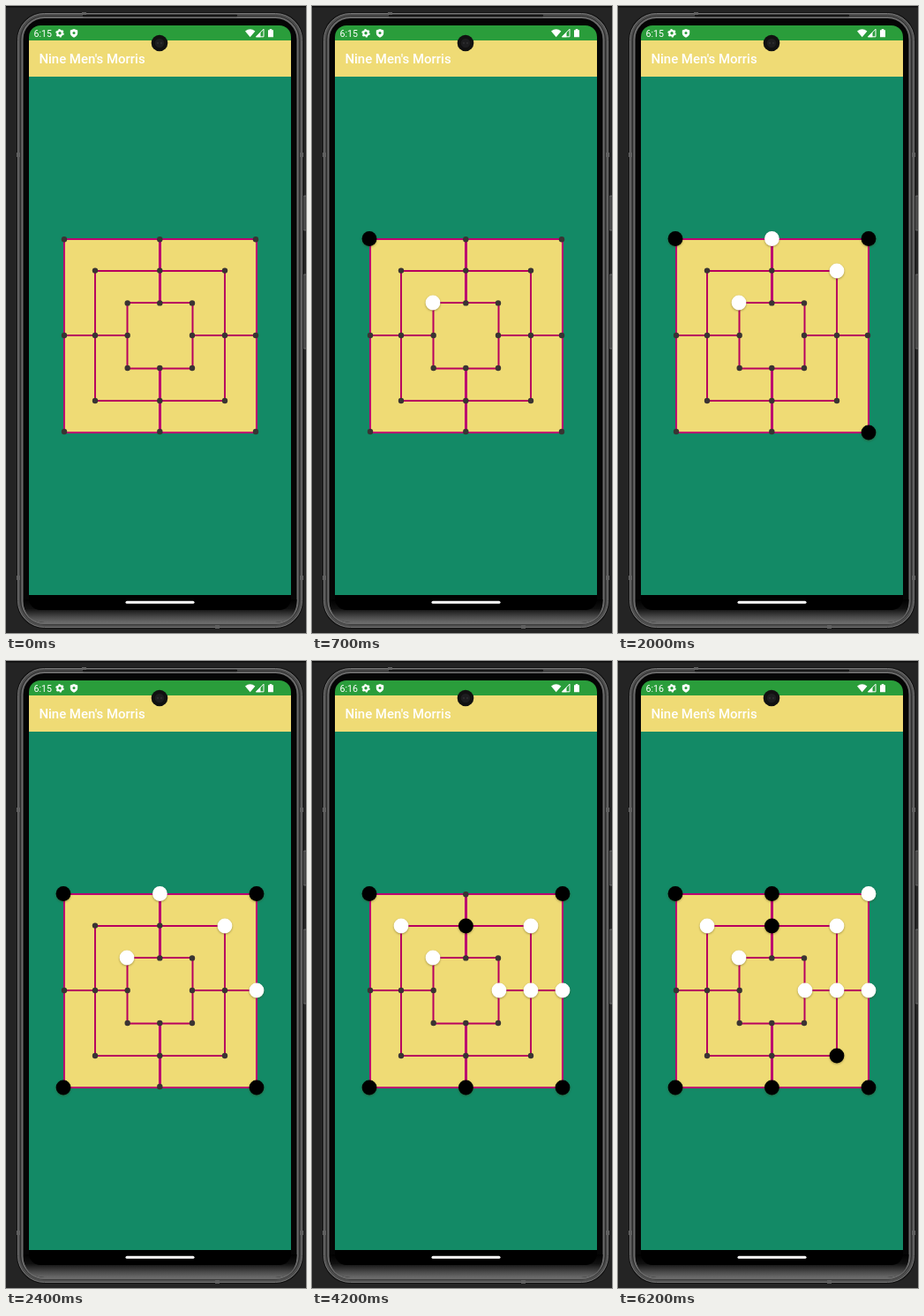
These frames come from a looping animation (340x710 px, 8 s). An HTML page:

```html
<!DOCTYPE html>
<html lang="en">
<head>
<meta charset="utf-8">
<title>Board game</title>
<style>
  html, body { margin: 0; width: 340px; height: 710px; overflow: hidden; background: #242424; }
  svg { display: block; }
  text { fill: #fff; font-family: Roboto, "Open Sans", sans-serif; }
  .line { fill: none; stroke: #b8005f; stroke-width: 2; }
  .edge { stroke: #bc0070; }
  .spoke { stroke: #bc0070; stroke-width: 3; }
  .dot { fill: #3a3433; }
  .piece { filter: drop-shadow(0 1px 1px rgba(60, 50, 10, .4)); }
</style>
</head>
<body>
<svg width="340" height="710" viewBox="0 0 340 710">
  <defs>
    <linearGradient id="chin" x1="0" x2="0" y1="0" y2="1">
      <stop offset="0" stop-color="#000"/>
      <stop offset=".4" stop-color="#101010"/>
      <stop offset=".75" stop-color="#484848"/>
      <stop offset="1" stop-color="#6a6a6a"/>
    </linearGradient>
    <clipPath id="screen"><rect x="26" y="22" width="297" height="662" rx="13"/></clipPath>
  </defs>

  <!-- phone body -->
  <rect width="340" height="710" fill="#242424"/>
  <rect width="340" height="1.5" fill="#0c0c0c"/>
  <g fill="#454545" stroke="#787878" stroke-width=".8">
    <rect x="337" y="215" width="5" height="39" rx="1"/>
    <rect x="337" y="304" width="5" height="84" rx="1"/>
  </g>
  <rect x="12" y="7" width="325" height="698" rx="31" fill="#141414"/>
  <rect x="13.5" y="8.5" width="322" height="695" rx="30" fill="#4e4e4e" stroke="#777"/>
  <rect x="16.5" y="11.5" width="316" height="688.5" rx="27" fill="#3c3c3c" stroke="#2a2a2a"/>
  <rect x="18.5" y="13" width="312" height="686" rx="25" fill="#050505" stroke="#6a6a6a" stroke-width="2"/>
  <path d="M20 672H329.5Q329.5 698 305 698H44Q20 698 20 672Z" fill="url(#chin)"/>
  <path d="M88 11H261" stroke="#151515" stroke-width="2.4" stroke-linecap="round"/>
  <g fill="#606060">
    <rect x="12" y="166" width="4" height="5"/><rect x="333" y="166" width="4" height="5"/>
    <rect x="12" y="645" width="4" height="5"/><rect x="333" y="645" width="4" height="5"/>
    <rect x="86" y="7" width="5" height="3"/><rect x="237" y="701" width="5" height="4"/>
  </g>

  <!-- screen -->
  <g clip-path="url(#screen)">
    <rect x="26" y="22" width="297" height="662" fill="#000"/>
    <rect x="26" y="22" width="297" height="18" fill="#2a9d3b"/>
    <rect x="26" y="39" width="297" height="41" fill="#efdb75"/>
    <rect x="26" y="80" width="297" height="587" fill="#138a66"/>
  </g>
  <rect x="135.5" y="673.8" width="78" height="3" rx="1.5" fill="#fff"/>

  <!-- status bar -->
  <text id="clock" x="31.5" y="34.6" font-size="10.6">6:15</text>
  <g fill="#fff">
    <circle cx="61" cy="30.8" r="2.7" fill="none" stroke="#fff" stroke-width="2"/>
    <circle cx="61" cy="30.8" r="4" fill="none" stroke="#fff" stroke-width="1.6" stroke-dasharray="2.1 2.089"/>
    <path d="M77 26 81.2 27.6V30.6Q81.2 34.2 77 35.8 72.8 34.2 72.8 30.6V27.6Z"/>
    <circle cx="77" cy="30.5" r="1.5" fill="#2a9d3b"/>
    <path d="M271 28.4Q276.7 24.2 282.4 28.4L276.7 35.2Z"/>
    <path d="M283.5 34.8 292 26.2V34.8Z" fill="none" stroke="#fff"/>
    <path d="M283 35.2 288.5 29.7V35.2Z"/>
    <path d="M297 27.2H298.7V26H301.3V27.2H303V35.2H297Z"/>
  </g>
  <text x="37.4" y="65.4" font-size="14.95" font-weight="500">Nine Men's Morris</text>
  <circle cx="174" cy="42" r="9.3" fill="#111"/>
  <circle cx="174" cy="42" r="5.3" fill="#1d1d1f"/>
  <path d="M171 42H173M175 42H177" stroke="#38383b"/>

  <!-- board -->
  <rect x="66" y="264" width="218" height="219" fill="#efdb75"/>
  <rect class="line edge" x="66" y="264" width="218" height="219"/>
  <rect class="line" x="101" y="300" width="147" height="147"/>
  <rect class="line" x="137.5" y="336" width="74" height="74.5"/>
  <path class="line" d="M66 373H137.5M211.5 373H284"/>
  <path class="spoke" d="M174.5 264V336M174.5 410V483"/>
  <g id="dots"></g>
  <g id="pieces"></g>
</svg>
<script>
  const LOOP = 8000, MINUTE = 2500;
  const dotX = [66, 101, 137.7, 174.3, 211, 248, 283];
  const dotY = [264.2, 299.6, 336.4, 373, 410, 447, 482];
  const pieceX = [65, 101, 137, 174.4, 212, 248, 284];
  const pieceY = [263.5, 300, 336, 373, 410, 447, 483];
  const W = '#fff', B = '#000';

  // colour, column, row, time placed, time captured
  const moves = [
    [W, 2, 2, 500], [B, 0, 0, 500],
    [W, 5, 1, 1200], [B, 6, 6, 1200],
    [W, 3, 0, 1800, 2900], [B, 6, 0, 1800, 5400],
    [W, 6, 3, 2200], [B, 0, 6, 2200],
    [W, 1, 1, 2600], [B, 3, 1, 2600],
    [W, 5, 3, 2900], [B, 3, 6, 2900],
    [W, 4, 3, 4200], [B, 3, 0, 5400],
    [W, 6, 0, 6000], [B, 5, 5, 6000]
  ];

  function circle(parent, cls, cx, cy, r, fill) {
    const el = document.createElementNS('http://www.w3.org/2000/svg', 'circle');
    const attrs = { class: cls, cx, cy, r };
    if (fill) attrs.fill = fill;
    for (const key in attrs) el.setAttribute(key, attrs[key]);
    document.getElementById(parent).append(el);
    return el;
  }

  // Each ring has eight points around the centre.
  for (let ring = 1; ring <= 3; ring++)
    for (let dx = -1; dx <= 1; dx++)
      for (let dy = -1; dy <= 1; dy++)
        if (dx || dy) circle('dots', 'dot', dotX[3 + dx * ring], dotY[3 + dy * ring], 3.2);

  const pieces = moves.map(([color, col, row, from, to = LOOP]) =>
    ({ el: circle('pieces', 'piece', pieceX[col], pieceY[row], 8.4, color), from, to }));
  const clock = document.getElementById('clock');

  function draw() {
    const t = performance.now() % LOOP;
    for (const p of pieces)
      p.el.style.display = t >= p.from && t < p.to ? '' : 'none';
    clock.textContent = t < MINUTE ? '6:15' : '6:16';
    requestAnimationFrame(draw);
  }
  draw();
</script>
</body>
</html>
```
